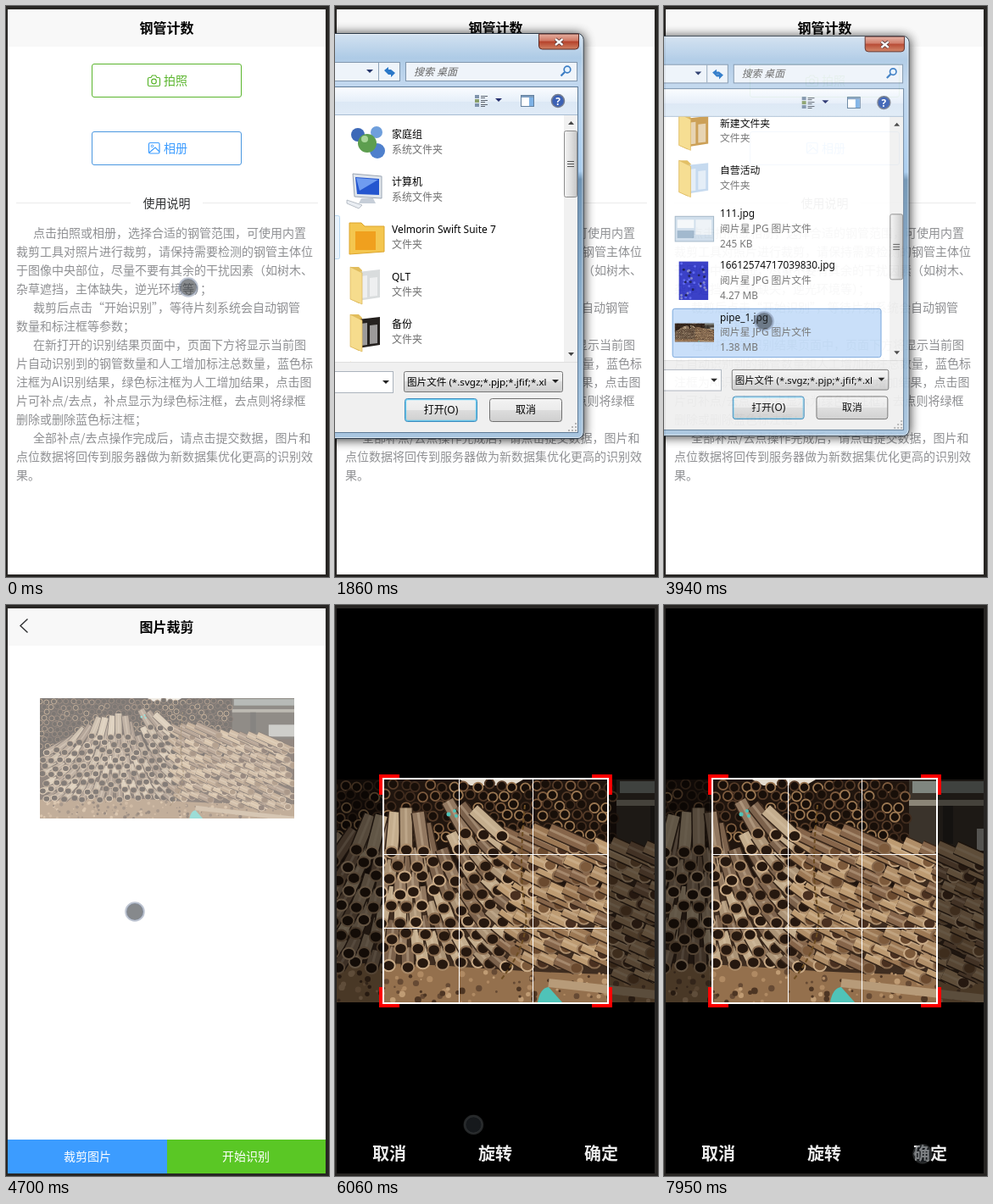
An HTML page for the animation above (8 s loop, 381 px wide and 674 px high).

```html
<!DOCTYPE html>
<html lang="zh-CN">
<head>
<meta charset="utf-8">
<style>
html, body { margin: 0; width: 100%; height: 100%; overflow: hidden; background: #282624; }
svg { display: block; width: 381px; height: 674px; font-family: "Noto Sans", "Noto Sans CJK SC", "Noto Sans CJK", sans-serif; }
#page text { font-family: "Noto Sans CJK SC", "Noto Sans CJK", sans-serif; }
text { white-space: pre; }
</style>
</head>
<body>
<svg id="stage" viewBox="0 0 381 674"></svg>
<script>
const LOOP = 8000;
const stage = document.getElementById('stage');
const $ = id => document.getElementById(id);

let seed = 11;
const rnd = () => (seed = seed * 16807 % 2147483647) / 2147483647;
const pick = list => list[Math.floor(rnd() * list.length)];
const clamp = (v, lo = 0, hi = 1) => Math.max(lo, Math.min(hi, v));

const text = (x, y, s, size = 12, fill = '#000', more = '') =>
  `<text x="${x}" y="${y}" font-size="${size}" fill="${fill}" ${more}>${s}</text>`;
const rect = (x, y, w, h, fill, more = '') =>
  `<rect x="${x}" y="${y}" width="${w}" height="${h}" fill="${fill}" ${more}/>`;
const path = (d, fill = 'none', more = '') => `<path d="${d}" fill="${fill}" ${more}/>`;
const line = (d, color, width = 1, more = '') => path(d, 'none', `stroke="${color}" stroke-width="${width}" ${more}`);
const circle = (x, y, r, fill, more = '') => `<circle cx="${x}" cy="${y}" r="${r}" fill="${fill}" ${more}/>`;
const group = (id, body, more = '') => `<g id="${id}" ${more}>${body}</g>`;
const grad = (id, stops) => `<linearGradient id="${id}" x2="0" y2="1">` +
  stops.map(([o, c]) => `<stop offset="${o}" stop-color="${c}"/>`).join('') + '</linearGradient>';
const middle = 'text-anchor="middle"';
const arrow = (x, y, c = '#222') => path(`M${x - 4} ${y - 2}h8l-4 4z`, c);

// One pipe: body running back from its open mouth at x, y
function pipe(x, y, len) {
  const d = clamp((x - 170) / 170, -1, 1), right = clamp((x - 220) / 160);
  const bx = x - d * len, by = y - len * (1 - Math.abs(d) * .55);
  const body = `M${bx.toFixed(1)} ${by.toFixed(1)}L${x.toFixed(1)} ${y.toFixed(1)}`;
  const tone = pick(right > .5 ? ['#b08e68', '#9c7854', '#86654a', '#bd9b72'] : ['#ab9376', '#927860', '#7c624c', '#c4ad8d']);
  return line(body, '#37261a', 17) + line(body, tone, 14) +
    line(body, '#e0ccb0', 3, 'stroke-opacity=".35"') +
    `<ellipse cx="${x.toFixed(1)}" cy="${y.toFixed(1)}" rx="7.3" ry="6.6" fill="${right > .5 ? pick(['#4a3020', '#6b4a2f', '#7d5a3b']) : '#26180f'}" stroke="${pick(['#c9aa86', '#a98a69', '#8a6c50'])}" stroke-width="2"/>`;
}

// Pile of pipes, 556 x 263 units
function photo() {
  let s = rect(0, 0, 556, 263, '#3f2d20') + rect(0, 0, 425, 130, '#20150e') + path('M235 0h75l-12 7h-50z', '#e4dccf');
  s += rect(420, 0, 136, 90, '#3a332b') + rect(424, 2, 132, 14, '#7f867f') + rect(420, 24, 136, 7, '#8b8577') +
    rect(460, 31, 12, 45, '#292520') + rect(500, 58, 56, 26, '#a9a8a2');
  for (let j = 0; j < 10; j++) for (let x = j % 2 * 7; x < 420; x += 14) {
    const y = 5 + j * 12;
    if (y < 70 + Math.max(0, (110 - x) * .4))
      s += circle((x + rnd() * 5).toFixed(1), (y + rnd() * 5).toFixed(1), 5.6, '#180f09', `stroke="${pick(['#7d5b3e', '#9c7852', '#553b28', '#412c1e'])}" stroke-width="1.8"`);
  }
  s += path('M0 222Q120 212 250 222T556 232V263H0z', '#94704d');
  for (let k = 0; k < 170; k++)
    s += circle((rnd() * 556).toFixed(1), (226 + rnd() * 37).toFixed(1), (1 + rnd() * 3).toFixed(1), pick(['#4d3523', '#c09c74', '#664a34', '#b08a63']));
  // Lower rows first, so that every mouth stays in sight
  for (let j = 10; j >= 0; j--) for (let i = 0; i < 28; i++) {
    const x = i * 20 + j % 2 * 10 + rnd() * 7, y = 62 + j * 17 + rnd() * 8;
    const top = x < 230 ? 82 + Math.max(0, (110 - x) * .3) : 58 + (x - 230) * .14;
    if (y > top && y < 230 + Math.max(0, (x - 380) * .1)) s += pipe(x, y, y < top + 17 ? 50 : 24);
  }
  s += line('M340 240L556 264', '#b79b79', 10) + line('M312 30Q304 110 312 150T284 236', '#6d4d23', 2, 'stroke-dasharray="5 3"');
  s += circle(222, 41, 2.5, '#4fc3b8') + circle(229, 37, 2, '#4fc3b8') + circle(231, 43, 2, '#4fc3b8');
  return s + path('M327 263Q330 246 340 245L356 263z', '#4fc3b8');
}

const guide = [
  '>点击拍照或相册，选择合适的钢管范围，可使用内置',
  '裁剪工具对照片进行裁剪，请保持需要检测的钢管主体位',
  '于图像中央部位，尽量不要有其余的干扰因素（如树木、',
  '杂草遮挡，主体缺失，逆光环境等）；',
  '>裁剪后点击“开始识别”，等待片刻系统会自动钢管',
  '数量和标注框等参数；',
  '>在新打开的识别结果页面中，页面下方将显示当前图',
  '片自动识别到的钢管数量和人工增加标注总数量，蓝色标',
  '注框为AI识别结果，绿色标注框为人工增加结果，点击图',
  '片可补点/去点，补点显示为绿色标注框，去点则将绿框',
  '删除或删除蓝色标注框；',
  '>全部补点/去点操作完成后，请点击提交数据，图片和',
  '点位数据将回传到服务器做为新数据集优化更高的识别效',
  '果。'
];

const header = title => rect(2, 4, 375, 667, '#fff') + rect(2, 4, 375, 44, '#f8f8f8') +
  text(189.5, 32, title, 16, '#000', middle + ' font-weight="700"');

function homePage() {
  const green = '#5ab52d', blue = '#3c9cff';
  let s = header('钢管计数');
  s += rect(101.5, 68.5, 176, 39, '#fff', `rx="2.5" stroke="${green}"`) +
    line('M169 84.5h2l1.5-2.5h4l1.5 2.5h2q1.5 0 1.5 1.5v7q0 1.5-1.5 1.5h-11q-1.5 0-1.5-1.5v-7q0-1.5 1.5-1.5z', green, 1.2) +
    circle(174.5, 89, 2.8, 'none', `stroke="${green}" stroke-width="1.2"`) + text(186, 93, '拍照', 14, green);
  s += rect(101.5, 148.5, 176, 39, '#fff', 'rx="2.5" stroke="#4a97e0"') +
    rect(168.5, 161.5, 12.5, 12.5, 'none', `rx="1.5" stroke="${blue}" stroke-width="1.2"`) +
    circle(172.5, 165.3, 1.3, 'none', `stroke="${blue}"`) + line('M169 173l7-6 5 5', blue, 1.2) +
    text(186, 173, '相册', 14, blue) + rect(101, 148, 177, 40, '#000', 'id="press" rx="3" opacity=".15"');
  s += line('M12 232.5H147M232 232.5H368', '#ebebeb') + text(189.5, 238, '使用说明', 14, '#303133', middle);
  guide.forEach((g, i) => {
    const indent = g[0] === '>';
    s += text(indent ? 32 : 12, 273 + i * 22, indent ? g.slice(1) : g, 14, '#8f9093');
  });
  return s;
}

const cutPage = () => header('图片裁剪') + line('M25.5 16.5l-8.5 8 8.5 8', '#303133', 1.4) +
  '<use id="thumb" href="#photo" transform="translate(40 110) scale(.5396)"/>' +
  rect(2, 631, 188, 40, '#3c9cff') + rect(190, 631, 187, 40, '#5ac725') +
  text(96, 656, '裁剪图片', 14, '#fff', middle + ' font-weight="500"') +
  text(283, 656, '开始识别', 14, '#fff', middle + ' font-weight="500"');

function cropPage() {
  let s = rect(2, 4, 375, 667, '#000') + '<g clip-path="url(#strip)"><use id="pan" href="#photo"/></g>';
  s += path('M2 206H377V469H2zM57 206V469H322V206z', '#000', 'fill-opacity=".5" fill-rule="evenodd"');
  s += path('M52 200h24v4H56v20h-4zM327 200h-24v4h20v20h4zM52 475h24v-4H56v-20h-4zM327 475h-24v-4h20v-20h4z', '#f00');
  s += rect(57, 205, 265, 265, 'none', 'stroke="#fff" stroke-width="2"') +
    line('M146.5 206V469M233.5 206V469M58 294.5H321M58 381.5H321', '#fff');
  ['取消', '旋转', '确定'].forEach((w, i) => s += text(64 + i * 125, 654.5, w, 20, '#ececec', middle + ' font-weight="700"'));
  return s;
}

const folder = (y, paper) => path(`M18 ${y - 21}h10l4 4v36l-4 3-10-5z`, '#e2bd5c') +
  path(`M27 ${y - 15}l26-3v33l-26 4z`, paper) + path(`M30 ${y - 10}l8-1v26l-8 1zM41 ${y - 8}l9-1v22l-9 1z`, '#fff', 'opacity=".55"') +
  path(`M18 ${y - 21}l14 7v37l-14-6z`, '#f6dc8d', 'stroke="#dcb75a" stroke-width=".7"');

const icons = [
  y => circle(27, y - 9, 8, '#3d69b8') + circle(49, y - 12, 7, '#6f9fdc') + circle(50, y + 10, 9, '#4f80cc') +
    circle(38, y + 1, 11, '#5d9e4f') + circle(35, y - 4, 4, '#a9d69a'),
  y => path(`M21 ${y - 19}l34 3v26l-32-2z`, '#dfe5ec', 'stroke="#9aa5b3"') + path(`M24 ${y - 15}l28 2v19l-26-1z`, '#2456cf') +
    path(`M25 ${y - 14}l26 2-22 13z`, '#6f9cf0') + path(`M31 ${y + 10}h14l3 6H28z`, '#c6ced8') + path(`M14 ${y + 12}l18 6-4 4-14-6z`, '#e9edf2', 'stroke="#a0a8b2" stroke-width=".7"'),
  y => path(`M17 ${y - 17}h14l4 4h23v30l-41 3z`, '#f4c64f', 'stroke="#dca52d"') + rect(24, y - 7, 24, 22, '#f0a01e'),
  y => folder(y, '#d9dcdd'),
  y => folder(y, '#25211f'),
  y => folder(y, '#b9cbe0'),
  y => folder(y, '#c99b4d'),
  y => folder(y, '#c3d8ef'),
  y => rect(13.5, y - 15, 46, 30, '#cfdeeb', 'stroke="#9fb4c6"') + rect(16, y - 11, 20, 10, '#f5f8fa') + rect(38, y - 11, 19, 18, '#eef3f7') + rect(16, y + 2, 20, 9, '#9db5cb'),
  y => {
    let s = rect(18, y - 23, 35, 46, '#2f36c4');
    for (let i = 0; i < 40; i++) s += circle((20 + rnd() * 31).toFixed(1), (y - 21 + rnd() * 42).toFixed(1), 1.5, pick(['#171a55', '#5862ee', '#7f83c9']));
    return s;
  },
  y => `<use href="#photo" transform="translate(13 ${y - 11}) scale(.0845)"/>`
];
const dir = '文件夹', pic = '阅片星 JPG 图片文件';
const rows = [
  ['家庭组', '系统文件夹'], ['计算机', '系统文件夹'], ['Velmorin Swift Suite 7', dir], ['QLT', dir], ['备份', dir],
  ['文档资料', dir], ['新建文件夹', dir], ['自营活动', dir],
  ['111.jpg', pic, '245 KB'], ['16612574717039830.jpg', pic, '4.27 MB'], ['pipe_1.jpg', pic, '1.38 MB']
];
const SCROLL = 351;
const rowY = i => i < 8 ? 161 + 56 * i : SCROLL + 263 + 62 * (i - 8);

const rowMark = (id, i, fill, edge) =>
  rect(10.5, rowY(i) - 28.5, 249, 58, fill, `id="${id}" rx="2.5" stroke="${edge}"`);

function fileList() {
  let s = rowMark('hoverA', 9, '#e9f3fd', '#b8d6f5') + rowMark('hoverB', 10, '#e9f3fd', '#b8d6f5') + rowMark('chosen', 10, '#c6def9', '#7da9dd');
  rows.forEach((r, i) => {
    const y = rowY(i), first = y - (r.length === 2 ? 5 : 14);
    s += icons[i](y) + r.map((w, k) => text(67, first + k * 18, w, 12, k ? '#707070' : '#000')).join('');
  });
  return s;
}

const button = (x, label, edge, id = '') => rect(x + .5, 463.5, 85, 27, 'url(#btn)', `rx="3" stroke="${edge}"`) +
  (id ? rect(x + 1.5, 464.5, 83, 25, 'none', `id="${id}" rx="2" stroke="#46c5f5" stroke-width="1.5"`) : '') +
  text(x + 43, 481, label, 12, '#000', middle);

function dialog() {
  let s = rect(-40, 33, 334, 479, '#000', 'rx="7" filter="url(#soft)" opacity=".85"');
  s += rect(-40, 32.5, 333, 478, 'url(#glass)', 'rx="7" stroke="#2d3c4c"') + rect(-39, 33.5, 331, 476, 'none', 'rx="6" stroke="#fff" stroke-opacity=".6"');
  s += path('M240.5 33h47v14q0 4-4 4h-39q-4 0-4-4z', 'url(#close)', 'stroke="#5b2a24"') +
    line('M260 39l8.5 7M268.5 39l-8.5 7', '#4a2a2a', 4) + line('M260 39l8.5 7M268.5 39l-8.5 7', '#fff', 2.4);
  s += rect(-5, 66.5, 81.5, 22, '#eef4fa', 'stroke="#8096ad"') + line('M51.5 67V88', '#8ea3b8') + arrow(41, 77, '#26376b') +
    path('M58 76l5-4v3h3v3h-3v3z', '#2a78c8') + path('M71 79l-5-4v3h-3v3h3v3z', '#2a78c8');
  s += rect(83.5, 66.5, 202, 22, '#eff4fa', 'stroke="#8096ad"') + text(93, 82, '搜索 桌面', 12, '#666', 'font-style="italic"') +
    circle(274, 75, 3.8, '#e8f4ff', 'stroke="#3b7dc4" stroke-width="1.7"') + line('M271 78l-4.5 4.5', '#3b7dc4', 2.3);
  s += rect(-5, 95.5, 291.5, 408, '#f0f0f0', 'stroke="#5f7b97"') + rect(-5, 96, 291, 33, 'url(#bar)') + line('M0 128.5H286', '#a7bcd2');
  for (let i = 0; i < 3; i++) s += rect(165, 105 + i * 5, 5, 4, i % 2 ? '#8aa06c' : '#7f93ac') + line(`M172 ${106.5 + i * 5}h8M172 ${108.5 + i * 5}h5`, '#5d6570');
  s += arrow(193, 111, '#26306e') + rect(219.5, 105.5, 15, 13, '#fff', 'stroke="#63809e"') + rect(220, 106, 14, 2, '#7d9dbf') + rect(229, 108, 5, 10, '#7eb2e6') +
    circle(263, 112, 7.5, '#3b61b5', 'stroke="#777f91" stroke-width="1.5"') + text(263, 117, '?', 12, '#fff', middle + ' font-weight="700"');
  s += rect(0, 129, 270, 291, '#fff') + group('view', group('list', fileList()) + rect(-6, 247.5, 11.5, 51, '#eaf4fd', 'id="sliver" rx="2" stroke="#b8d8f2"'), 'clip-path="url(#listBox)"');
  s += rect(270, 129, 16, 291, '#f1f1f1') + path('M275 140l3.5-4 3.5 4zM275 409l3.5 4 3.5-4z', '#444');
  s += group('thumbBar', rect(270.5, 147.5, 15, 78, 'url(#scroll)', 'rx="2" stroke="#8c8c8c"') + line('M274 183.5h8M274 186.5h8M274 189.5h8', '#555'));
  s += line('M0 420.5H286', '#dfdfdf') + rect(-5, 431.5, 73.5, 25, '#fff', 'stroke="#abb3bd"') + arrow(60, 444);
  s += rect(81.5, 431.5, 187, 24, 'url(#btn)', 'rx="2" stroke="#777"') + arrow(260, 443) +
    `<g clip-path="url(#combo)">${text(85, 448, '图片文件 (*.svgz;*.pjp;*.jfif;*.xl', 11.6)}</g>`;
  s += button(82, '打开(O)', '#3c7fb1', 'pulse') + button(182, '取消', '#707070');
  for (let i = 0; i < 3; i++) for (let j = 0; j <= i; j++) s += rect(283 - j * 4, 492 + i * 4, 2, 2, '#b3b3b3');
  return s;
}

stage.innerHTML = `<defs>
${grad('glass', [[0, '#d3e2f1'], [.06, '#aecbe6'], [.12, '#c1d7ee'], [.34, '#a9cdef'], [.36, '#6f93b3'], [.7, '#8fb2d0'], [1, '#a9c6e0']])}
${grad('close', [[0, '#e6b0a2'], [.45, '#cf7763'], [.5, '#b5412a'], [1, '#d08263']])}
${grad('bar', [[0, '#fafcff'], [.5, '#e6eff9'], [.52, '#dce8f5'], [1, '#e0ebf7']])}
${grad('btn', [[0, '#f3f3f3'], [.49, '#ebebeb'], [.5, '#dddddd'], [1, '#cfcfcf']])}
<linearGradient id="scroll"><stop stop-color="#f5f5f5"/><stop offset=".5" stop-color="#e0e0e0"/><stop offset="1" stop-color="#c6c6c6"/></linearGradient>
<filter id="soft" x="-20%" y="-20%" width="140%" height="140%"><feGaussianBlur stdDeviation="6.5"/></filter>
<clipPath id="listBox"><rect y="129" width="270" height="291"/></clipPath>
<clipPath id="combo"><rect x="83" y="432" width="166" height="24"/></clipPath>
<clipPath id="strip"><rect x="2" y="206" width="375" height="263"/></clipPath>
<clipPath id="edge"><rect width="556" height="263"/></clipPath>
<g id="photo" clip-path="url(#edge)">${photo()}</g></defs>` +
  rect(0, 0, 381, 674, '#282624') +
  group('page', group('home', homePage()) + group('cut', cutPage()) + group('crop', cropPage())) +
  group('dialog', dialog()) +
  group('cursor', circle(0, 0, 10, '#282d32', 'id="dot"') + circle(0, 0, 10.5, 'none', 'id="ring" stroke-opacity=".5" stroke-width="2.6"'));

const ramp = (t, a, b) => clamp((t - a) / (b - a));
const smooth = u => u * u * (3 - 2 * u);
const show = (id, on) => $(id).style.display = on ? '' : 'none';
const fade = (id, v) => $(id).setAttribute('opacity', v.toFixed(3));
const move = (id, v) => $(id).setAttribute('transform', v);

const cursorPath = [
  [70, 215, 332], [860, 207, 170], [3800, 207, 170], [3801, 118, 372], [4300, 118, 372], [4490, 152, 362],
  [4720, 152, 362], [5340, 155, 653], [5920, 155, 653], [6450, 203, 427], [6540, 203, 427],
  [6750, 189, 427], [7030, 167, 427], [7290, 167, 427], [7950, 305, 648]
];
const panPath = [[6540, -88], [6750, -100], [7030, -131]];

function along(keys, t) {
  if (t <= keys[0][0]) return keys[0].slice(1);
  for (let i = 1; i < keys.length; i++) {
    const a = keys[i - 1], b = keys[i];
    if (t < b[0]) {
      const u = smooth(ramp(t, a[0], b[0]));
      return a.slice(1).map((v, k) => v + (b[k + 1] - v) * u);
    }
  }
  return keys[keys.length - 1].slice(1);
}

function draw(t) {
  show('home', t < 4490);
  show('cut', t >= 4490 && t < 5660);
  show('crop', t >= 5660);
  show('press', t >= 930 && t < 1110);
  fade('thumb', 1 - (1 - ramp(t, 4560, 4980)) ** 2);
  move('pan', `translate(${along(panPath, t)[0].toFixed(2)} 206)`);

  const enter = ramp(t, 1230, 1520), leave = ramp(t, 3880, 4130);
  const open = t >= 1230 && leave < 1;
  show('dialog', open);
  if (open) {
    const k = 1 - .08 * (1 - enter) ** 2 - .054 * leave;
    move('dialog', `translate(-10 271) scale(${k.toFixed(4)}) translate(10 -271)`);
    fade('dialog', smooth(enter) * (1 - leave ** 2));
    const notch = t < 2210 ? 0 : Math.min(7, Math.floor((t - 2210) / 86) + 1) / 7;
    move('list', `translate(0 ${(-SCROLL * notch).toFixed(2)})`);
    move('thumbBar', `translate(0 ${(98 * notch).toFixed(2)})`);
    fade('sliver', ramp(t, 1560, 1760) * (t < 2060 ? 1 : 0));
    fade('hoverA', ramp(t, 2950, 3060) * (1 - ramp(t, 3150, 3350)));
    fade('hoverB', ramp(t, 3150, 3280));
    fade('chosen', ramp(t, 3520, 3620));
    fade('pulse', t < 2990 ? .75 : .6 + .3 * Math.cos((t - 2990) / 240));
  }

  const [x, y] = along(cursorPath, t), drag = t >= 6480 && t < 7290;
  show('cursor', t < 1290 || t >= 3860);
  move('cursor', `translate(${x.toFixed(2)} ${y.toFixed(2)})`);
  $('dot').setAttribute('fill', drag ? '#b3a90c' : '#282d32');
  $('dot').setAttribute('fill-opacity', drag ? .75 : .56);
  $('ring').setAttribute('stroke', drag ? '#a29a26' : t >= 5660 ? '#4a4d50' : '#7d8ca5');
}

const start = performance.now();
function tick() {
  draw((performance.now() - start) % LOOP);
  requestAnimationFrame(tick);
}
tick();
</script>
</body>
</html>
```
